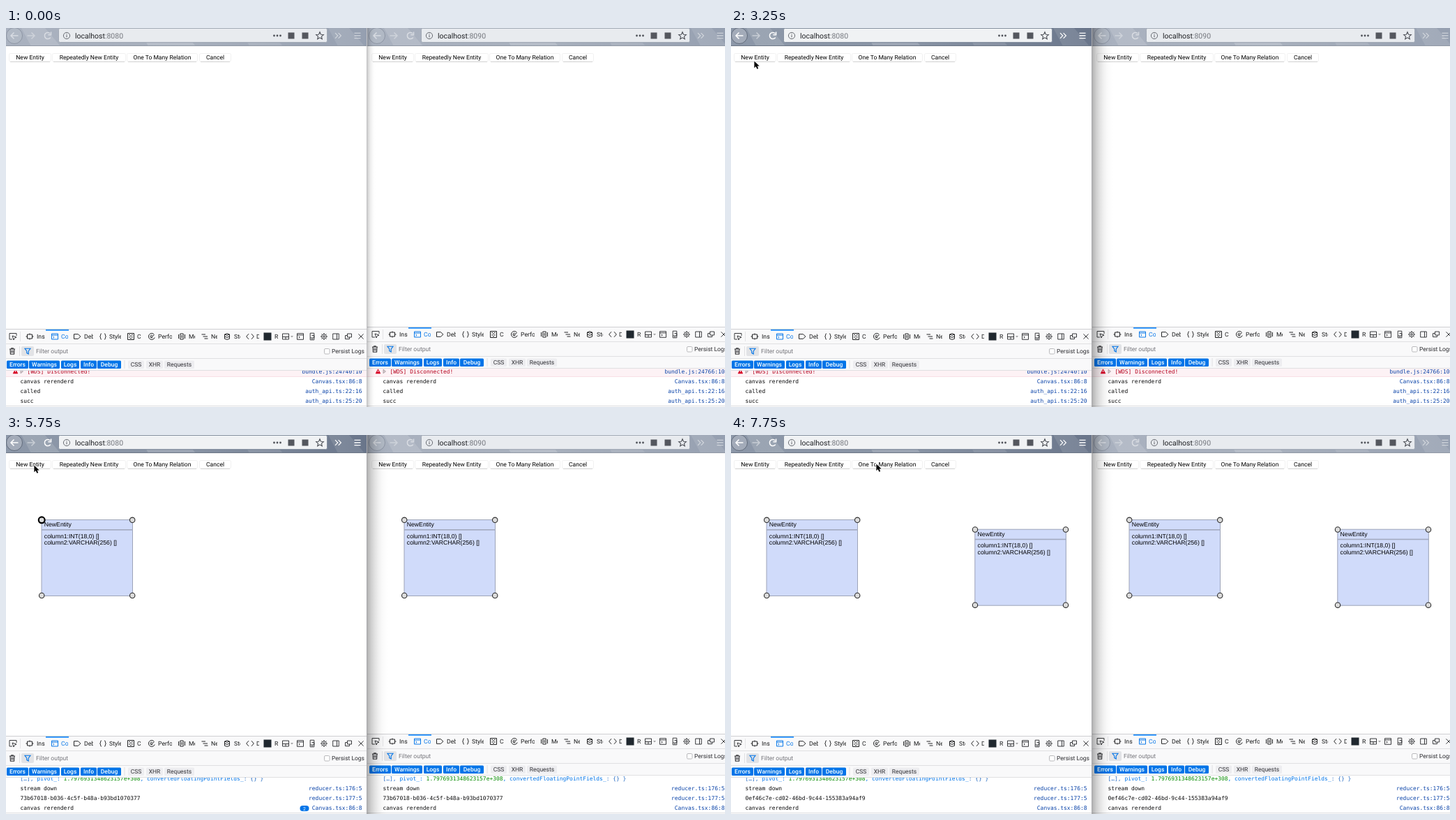
Animation, 1031 px wide and 543 px high, one loop 8 s. Source, as an HTML page with a canvas:

```html
<!DOCTYPE html>
<html lang="en">
<head>
<meta charset="utf-8">
<title>Shared entity diagram</title>
<style>
html, body { margin: 0; width: 100%; height: 100%; overflow: hidden; background: #fff; }
canvas { display: block; width: 1031px; height: 543px; }
</style>
</head>
<body>
<canvas id="stage" width="1031" height="543"></canvas>
<script>
const ctx = document.getElementById('stage').getContext('2d');
ctx.textRendering = 'geometricPrecision';
const STEP = 250, LOOP = 8000, PANE = 520, EDGE = 518;
const UI = 'Roboto, "Open Sans", sans-serif';
const MONO = '7.95px "DejaVu Sans Mono", "Liberation Mono", monospace';
const BLUE = '#0074e8', INK = '#18191a';

function rect(x, y, w, h, fill) {
  ctx.fillStyle = fill;
  ctx.fillRect(x, y, w, h);
}
function round(x, y, w, h, r, fill, stroke) {
  ctx.beginPath();
  ctx.roundRect(x, y, w, h, r);
  paint(fill, stroke);
}
function circle(x, y, r, fill, stroke, width) {
  ctx.beginPath();
  ctx.arc(x, y, r, 0, Math.PI * 2);
  paint(fill, stroke, width);
}
function paint(fill, stroke, width = 1) {
  if (fill) { ctx.fillStyle = fill; ctx.fill(); }
  if (stroke) { ctx.strokeStyle = stroke; ctx.lineWidth = width; ctx.stroke(); }
}
// SVG path data placed at x, y
function icon(x, y, d, stroke, width = 1, fill) {
  ctx.save();
  ctx.translate(x, y);
  const p = new Path2D(d);
  if (fill) { ctx.fillStyle = fill; ctx.fill(p); }
  if (stroke) { ctx.strokeStyle = stroke; ctx.lineWidth = width; ctx.stroke(p); }
  ctx.restore();
}
function text(s, x, y, color = '#000', font = '8.6px ' + UI, align = 'left') {
  ctx.font = font;
  ctx.textAlign = align;
  ctx.fillStyle = color;
  ctx.fillText(s, x, y);
}
function clip(x, y, w, h, draw) {
  ctx.save();
  ctx.beginPath();
  ctx.rect(x, y, w, h);
  ctx.clip();
  draw();
  ctx.restore();
}

/* ---- browser toolbar ---- */
function toolbar(port, active) {
  const g = ctx.createLinearGradient(0, 0, PANE, 0);
  const tones = active ? ['#8c97a8', '#8994a5', '#69758a'] : ['#a9b1bf', '#a8b0bd', '#959fb0'];
  tones.forEach((c, i) => g.addColorStop(i / 2, c));
  rect(-2, 0, PANE, 26, g);
  for (const [x, w, a] of [[22, 34, .13], [190, 60, .16], [335, 40, .1], [462, 30, .1]]) {
    ctx.beginPath();
    ctx.moveTo(x, 0);
    ctx.lineTo(x + w, 0);
    ctx.lineTo(x + w + 22, 26);
    ctx.lineTo(x + 14, 26);
    paint(`rgba(255,255,255,${a})`);
  }
  rect(-2, 25, PANE, 1, active ? '#6d7786' : '#9199a5');

  const on = active ? '#fff' : 'rgba(255,255,255,.5)';
  const dim = active ? 'rgba(255,255,255,.45)' : 'rgba(255,255,255,.35)';
  circle(12, 11, 11.5, active ? 'rgba(255,255,255,.2)' : 'rgba(255,255,255,.1)',
    active ? 'rgba(60,70,88,.6)' : 'rgba(80,90,108,.35)');
  icon(12, 11, 'M5.5 0H-5M-.5-4.5L-5 0L-.5 4.5', on, 1.5);
  icon(36, 11, 'M-5.5 0H5M.5-4.5L5 0L.5 4.5', dim, 1.5);
  icon(60, 11, 'M3.8 2.6A4.6 4.6 0 1 1 3.4-3.1M4.6-5.4V-1.2H.4', on, 1.5);

  round(75.5, .5, 385, 20, 2, active ? '#f0f2f4' : '#e8ebef', active ? '#8590a0' : '#a2aab6');
  circle(87, 11, 4.6, null, '#5c5f66', .9);
  rect(86.5, 10.2, 1, 3.2, '#5c5f66');
  rect(86.5, 8.2, 1, 1.1, '#5c5f66');
  text('localhost', 99, 14.7, '#202226', '10.5px ' + UI);
  const w = ctx.measureText('localhost').width;
  text(':' + port, 99 + w, 14.7, '#74777e', '10.5px ' + UI);
  for (const x of [384.5, 389, 393.5]) circle(x, 11, 1.4, '#50535a');
  for (const x of [404.5, 424.5]) rect(x, 6.5, 9, 9, '#54575e');
  star(450, 11.3);
  icon(476, 11, 'M-4-3.8L-.2 0L-4 3.8M.6-3.8L4.4 0L.6 3.8', on, 1.2);
  icon(504, 11, 'M-4.5-3.6H4.5M-4.5 0H4.5M-4.5 3.6H4.5', on, 1.3);
}
function star(x, y) {
  ctx.beginPath();
  for (let i = 0; i < 10; i++) {
    const r = i % 2 ? 2.6 : 5.6, a = i * Math.PI / 5 - Math.PI / 2;
    ctx.lineTo(x + r * Math.cos(a), y + r * Math.sin(a));
  }
  ctx.closePath();
  paint(null, '#50535a', 1.1);
}

/* ---- page ---- */
function pageButtons() {
  for (const [label, x, w] of [['New Entity', 4, 61], ['Repeatedly New Entity', 66, 106],
    ['One To Many Relation', 173, 102], ['Cancel', 277, 46]]) {
    round(x + .5, 36.5, w - 1, 11.5, 2, '#fff', '#f1f1f1');
    rect(x + 2, 48, w - 4, 1, '#d6d6d6');
    text(label, x + w / 2, 45.3, '#000', '8.55px ' + UI, 'center');
  }
}
function entity(dx, dy, hot) {
  ctx.save();
  ctx.translate(dx, dy);
  rect(51, 121.5, 131, 109, '#d0dbfa');
  ctx.strokeStyle = '#9da4b8';
  ctx.lineWidth = 1;
  ctx.strokeRect(51, 121.5, 130.5, 109);
  rect(51, 135, 131, 1.6, '#a3aabf');
  const font = '8.67px "Liberation Sans", Arial, sans-serif';
  text('NewEntity', 54.8, 131, '#000', font);
  text('column1:INT(18,0) []', 54.8, 147.6, '#000', font);
  text('column2:VARCHAR(256) []', 54.8, 156.9, '#000', font);
  for (const x of [51.2, 181.2]) for (const y of [121.8, 230]) {
    const bold = hot && x < 100 && y < 200;
    circle(x, y, bold ? 4.4 : 3.7, '#dcdcdc', bold ? '#000' : '#2c2c2c', bold ? 2.2 : 1.1);
  }
  ctx.restore();
}

/* ---- developer tools ---- */
const TABS = [
  ['Inspector', 34, 44, 12, 'M-3.5-3H3.5V3H-3.5ZM-5.5 0H-3.5M3.5 0H5.5M0-4.5V-3M0 3V4.5'],
  ['Console', 70, 79, 10, 'M-4.5-4H4.5V4H-4.5ZM-4.5-2H4.5M-2.5-.2L-1 1.2L-2.5 2.6'],
  ['Debugger', 102, 112, 13, 'M-4.5-3.3H1.5L4.8 0L1.5 3.3H-4.5Z'],
  ['Style Editor', 139, 148, 17, 'M-2-4Q-3.5-4-3.5-2.5V-1L-4.5 0L-3.5 1V2.5Q-3.5 4-2 4M2-4Q3.5-4 3.5-2.5V-1L4.5 0L3.5 1V2.5Q3.5 4 2 4'],
  ['Canvas', 179, 188, 6, 'M-4.5-4.5H4.5V4.5H-4.5ZM-2.7-2.5H-1M1-2.5H2.7M-1-.8H1M-2.7 .9H-1M1 .9H2.7M-1 2.6H1'],
  ['Performance', 209, 218, 20, 'M4.2 1.5A4.5 4.5 0 1 1 3.2-3.2M-1.5 1.5L3.6-2.4M1.6 1A1.9 1.9 0 1 1 .5-1.9'],
  ['Memory', 252, 262, 9, 'M-2.2-4H2.2V4H-2.2ZM-4.5-3V3M4.5-3V3M0-2V2'],
  ['Network', 285, 294, 9, 'M-4.5-3H1M-2.5 0H4M-.5 3H4.5'],
  ['Storage', 317, 327, 9, 'M-3.5-3Q0-5.5 3.5-3V3.2Q0 5.5-3.5 3.2ZM-3.5-2.8Q0-.8 3.5-2.8M-3.5 .2Q0 2.2 3.5 .2'],
  ['DOM', 350, 359, 4, 'M-2-3.8L-5.3 0L-2 3.8M2-3.8L5.3 0L2 3.8'],
  ['React', 375, 385, 5, '']
];
const TOOLS = [
  [10, 'M-1 4H-5V-4.5H5V-1M-1-1L1 5L2.3 2.3L5 1Z'],
  [401, 'M-4.5-4H4.5V4H-4.5ZM-4.5 .5H4.5M0 .5V4'],
  [422, 'M-4.5-4.3H4.5V4.3H-4.5ZM-4.5-2.2H4.5M-2.3-.2L-.8 1.1L-2.3 2.4'],
  [439, 'M-2.8-4.8H2.8V4.8H-2.8ZM-2.8 2H2.8M-.7 3.4H.7M-.5-1.5H2.8V2'],
  [456, 'M3.4 0A3.4 3.4 0 1 1-3.4 0A3.4 3.4 0 1 1 3.4 0M1.3 0A1.3 1.3 0 1 1-1.3 0A1.3 1.3 0 1 1 1.3 0M0-5V-3.4M0 3.4V5M-5 0H-3.4M3.4 0H5M-3.5-3.5L-2.4-2.4M2.4 2.4L3.5 3.5M-3.5 3.5L-2.4 2.4M2.4-2.4L3.5-3.5'],
  [473, 'M-4.3-4H4.3V4H-4.3ZM1.5-4V4'],
  [491, 'M-1.5-4H4.5V1H-1.5ZM-1.5-1.5H-4.5V3.6H1.5V1'],
  [509, 'M-3.6-3.6L3.6 3.6M3.6-3.6L-3.6 3.6']
];
const FILTERS = [['Errors', 1, 31], ['Warnings', 33, 44], ['Logs', 79, 26], ['Info', 107, 23],
  ['Debug', 131, 34], ['CSS', 175, 23], ['XHR', 201, 24], ['Requests', 227, 43]];

function devtools(dy) {
  ctx.save();
  ctx.translate(0, dy);
  rect(-2, 431, PANE, 60, '#f9f9fa');
  for (const y of [431, 452, 473, 490]) rect(-2, y, PANE, 1, y === 431 ? '#cfcfd2' : '#e0e0e2');
  rect(57, 432, 33, 1.6, '#0a84ff');
  rect(20, 435, 1, 14, '#e4e4e6');
  for (const [name, ix, tx, w, d] of TABS) {
    const color = name === 'Console' ? BLUE : INK;
    if (d) icon(ix, 442, d, color, .95);
    else rect(ix - 5.5, 436.5, 11, 11, '#20282f');
    clip(tx, 434, w, 16, () => text(name, tx, 445, color, '8.67px ' + UI));
  }
  for (const [x, d] of TOOLS) icon(x, 442, d, '#303134', .95);
  icon(410, 442, 'M-2-1H2L0 1.5Z', null, 1, '#a0a0a2');

  icon(9, 463, 'M-4-3H4M-1.3-3V-4.3H1.3V-3M-3-3L-2.6 4.2H2.6L3-3M-1-1.2V2.6M1-1.2V2.6', '#303134', 1.1);
  rect(19, 456, 1, 14, '#e0e0e2');
  round(22, 456, 18, 14, 2, '#e2e3e6');
  icon(31, 463, 'M-4-3.7H4L1.2 0V4L-1.2 2.6V0Z', BLUE, 1.1);
  text('Filter output', 43, 466.1, '#737379', '8.6px ' + UI);
  round(456.5, 459.5, 7.5, 7.5, 1.5, '#fff', '#b9b9bc');
  text('Persist Logs', 467, 466.1, '#2b2b2f', '8.5px ' + UI);

  FILTERS.forEach(([label, x, w], i) => {
    const on = i < 5;
    round(x, 476.5, w, 11.5, 1.5, on ? BLUE : '#ededf0');
    text(label, x + w / 2, 485.4, on ? '#fff' : '#303035', (on ? '500 ' : '') + '8.5px ' + UI, 'center');
  });
  rect(169.5, 476, 1, 12, '#e0e0e2');
  ctx.restore();
}

/* ---- console ---- */
const RENDER = ['canvas rerenderd', 'Canvas.tsx:86:8'];
const CALLED = ['called', 'auth_api.ts:22:16'];
const SUCC = ['succ', 'auth_api.ts:25:20'];
const stream = id => [['pivot'], ['stream down', 'reducer.ts:176:5'], [id, 'reducer.ts:177:5'], RENDER];
const start = line => [['[WDS] Disconnected!', 'bundle.js:' + line, true], RENDER, CALLED, SUCC];
const CLICKED = [RENDER, CALLED, SUCC, RENDER];
const FIRST = stream('73b67018-b036-4c5f-b48a-b93bd1070377');
const SECOND = stream('0ef46c7e-cd02-46bd-9c44-155383a94af9');

function pivotLine(y) {
  let x = 20.5;
  for (const [s, c] of [['[…], ', '#2b6fc4'], ['pivot_: ', BLUE], ['1.7976931348623157e+308', '#058b00'],
    [', convertedFloatingPointFields_', BLUE], [': {} }', '#2b6fc4']]) {
    text(s, x, y, c, MONO);
    x += ctx.measureText(s).width;
  }
}
function consoleLog(dy, rows, badge, bar) {
  const top = 491 + dy;
  rect(-2, top, PANE, 543 - top, '#fff');
  clip(-2, top, PANE, 543 - top, () => {
    rows.forEach(([msg, link, error], i) => {
      const y = 495 + i * 14;
      if (error) {
        rect(-2, 485, PANE, 14, '#fdf2f5');
        rect(-2, 499, PANE, 1, '#f8dfe5');
        icon(13.5, 492, 'M0-3.2L3.4 3H-3.4Z', '#d70022', .6, '#d70022');
        rect(13.1, 490.6, .9, 2.4, '#fff');
        icon(22.5, 492, 'M-1.5-2.8L2 0L-1.5 2.8Z', '#9a8f92', .7, '#d8ccd0');
      }
      if (msg === 'pivot') pivotLine(y);
      else text(msg, error ? 30.5 : 20.5, y, error ? '#b5001c' : '#0c0c0d', MONO);
      if (link) text(link, 510.5, y, '#0842a8', MONO, 'right');
    });
    if (badge) {
      round(421.5, 531, 13, 8, 4, BLUE);
      text(badge, 428, 537.5, '#fff', '6.8px ' + UI, 'center');
    }
    if (bar) round(511, bar[0], 5, 540 - bar[0], 2.5, bar[1]);
  });
  rect(-2, 541, PANE, 1, '#dcdcde');
}

function pane(port, active, dy, log, boxes) {
  rect(-2, 26, PANE, 517, '#fff');
  toolbar(port, active);
  pageButtons();
  boxes.forEach(b => entity(...b));
  devtools(dy);
  consoleLog(dy, ...log);
}

function shadow(active) {
  const w = active ? 33 : 13;
  const g = ctx.createLinearGradient(EDGE, 0, EDGE + w, 0);
  const a = active ? .3 : .2;
  for (let i = 0; i <= 6; i++) g.addColorStop(i / 6, `rgba(0,0,0,${a * (1 - i / 6) ** 2.4})`);
  rect(EDGE, 0, w, 543, g);
}

/* ---- pointer: [time, x, y], moving evenly between points ---- */
const PATH = [[250, 414, 1], [1250, 190, 29], [1750, 38, 43], [2000, 38, 43], [2750, 34, 50],
  [3250, 33, 47], [3500, 33, 47], [4000, 47, 123], [4250, 48, 121], [4750, 141, 69], [5500, 42, 44],
  [5750, 40, 43], [6000, 67, 49], [6500, 345, 136], [7000, 348, 137], [7250, 338, 127], [7750, 208, 41]];
function pointer(t) {
  if (t < PATH[0][0]) return;
  let i = 0;
  while (i < PATH.length - 2 && PATH[i + 1][0] <= t) i++;
  const [t0, x0, y0] = PATH[i], [t1, x1, y1] = PATH[i + 1];
  const k = Math.min(1, (t - t0) / (t1 - t0));
  icon(x0 + (x1 - x0) * k, y0 + (y1 - y0) * k,
    'M.4 .4V10.2L2.7 8.1L4.4 11.8L6.2 11L4.6 7.5H7.7Z', '#fff', 1.3, '#000');
  icon(x0 + (x1 - x0) * k, y0 + (y1 - y0) * k,
    'M.4 .4V10.2L2.7 8.1L4.4 11.8L6.2 11L4.6 7.5H7.7Z', null, 1, '#000');
}

function leftLog(t) {
  if (t < 3500) return [start('24740:10')];
  if (t < 4250) return [CLICKED, t < 4000 ? '' : '2', [509, '#858585']];
  if (t < 5750) return [FIRST, '', t < 5000 && [523, t < 4750 ? '#9a9a9a' : '#d2d2d2']];
  if (t < 7250) return [FIRST, t < 7000 ? '2' : '3'];
  return [SECOND];
}
function rightLog(t) {
  return [t < 4250 ? start('24766:10') : t < 7250 ? FIRST : SECOND];
}
function boxes(t, first, second, hot) {
  const list = [];
  if (t >= first) list.push([0, 0, hot]);
  if (t >= second) list.push([298.8, 13.7, false]);
  return list;
}

function draw(t) {
  const active = t >= 1750;
  ctx.save();
  ctx.translate(PANE, 0);
  pane(8090, false, -3, rightLog(t), boxes(t, 4250, 7250, false));
  ctx.restore();
  shadow(active);
  clip(0, 0, EDGE, 543, () => {
    pane(8080, active, 0, leftLog(t), boxes(t, 4000, 7000, t >= 4250 && t < 7000));
    rect(517, 0, 1, 543, active ? '#a9a9ac' : '#c2c2c5');
  });
  pointer(t);
}

let last = -1;
const begin = performance.now();
function frame() {
  const step = Math.floor((performance.now() - begin) % LOOP / STEP);
  if (step !== last) draw((last = step) * STEP);
  requestAnimationFrame(frame);
}
frame();
</script>
</body>
</html>
```
